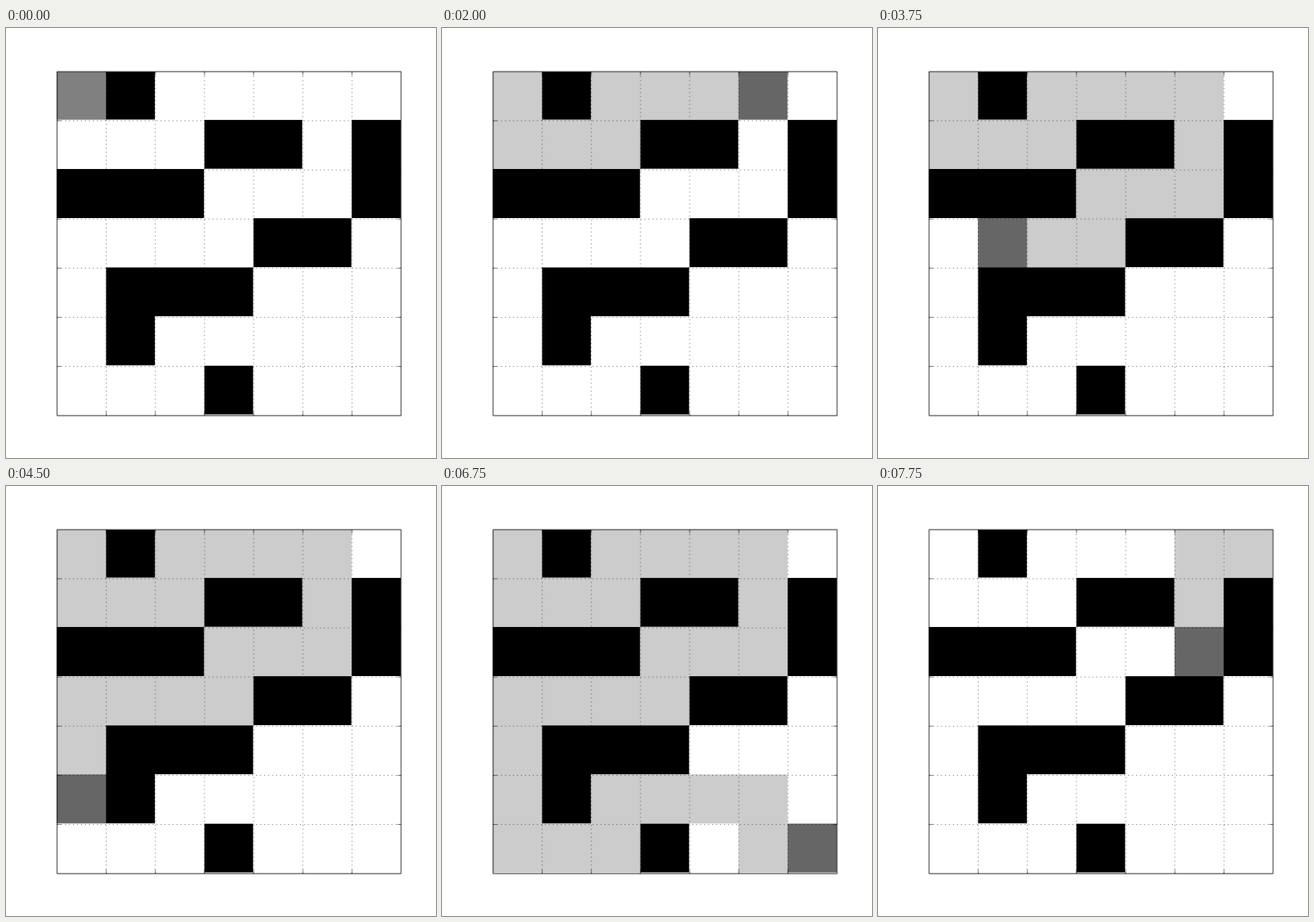
Recreate the animation shown at these times as a matplotlib script. Size 500x500 px, loop 8000 ms.

```python
import matplotlib.pyplot as plt
import numpy as np
from matplotlib.animation import FuncAnimation

STAGE = 500
N = 7
CELL = 400 / N
PX = 0.72  # points per pixel at 100 dpi
GAMMA = 2.2
FRAMES, STEP_MS = 32, 250

MAZE = [
    ".#.....",
    "...##.#",
    "###...#",
    "....##.",
    ".###...",
    ".#.....",
    "...#...",
]
WALLS = np.array([[c == "#" for c in row] for row in MAZE])

START, VISITED, HERE = 0.5, 0.8, 0.4
MOVES = {"U": (-1, 0), "D": (1, 0), "L": (0, -1), "R": (0, 1), "-": (0, 0)}
# Each walk: first frame, start cell, moves ("-" is a blocked move)
WALKS = [
    (0, (0, 0), "-DRRURRRDDLLDLLLDDDRRURRRDR"),
    (28, (0, 6), "LDD"),
]


def grid_at(frame):
    first, cell, moves = [w for w in WALKS if w[0] <= frame][-1]
    grid = np.where(WALLS, 0.0, 1.0)
    steps = moves[:frame - first]
    for m in steps:
        grid[cell] = VISITED
        cell = (cell[0] + MOVES[m][0], cell[1] + MOVES[m][1])
    grid[cell] = HERE if steps else START
    return grid


def coverage(origin, low):
    """Share of every stage pixel (rows) covered by each cell (columns)."""
    edges = np.maximum(origin + CELL * np.arange(N + 1), low)
    px = np.arange(STAGE)[:, None]
    overlap = np.minimum(px + 1, edges[1:]) - np.maximum(px, edges[:-1])
    return np.clip(overlap, 0, 1)


COLS = coverage(59.0, 59)
ROWS = coverage(49.6, 51)


def picture(frame):
    # Cell edges blend in linear light over a white stage
    ink = 1 - grid_at(frame) ** GAMMA
    return np.clip(1 - ROWS @ ink @ COLS.T, 0, 1) ** (1 / GAMMA)


fig = plt.figure(figsize=(5, 5), dpi=100, facecolor="white")
ax = fig.add_axes([0, 0, 1, 1])
board = ax.imshow(picture(0), cmap="gray", vmin=0, vmax=1, aspect="auto",
                  interpolation="nearest", extent=(0, STAGE, STAGE, 0))
ax.set_xlim(0, STAGE)
ax.set_ylim(STAGE, 0)
ax.axis("off")

LEFT, RIGHT, TOP, BOTTOM = 59.4, 459.4, 50.7, 450.7


def line(x, y, width, alpha, ls="-"):
    ax.plot(x, y, color="black", lw=width * PX, alpha=alpha, ls=ls, snap=False,
            solid_capstyle="butt", dash_capstyle="butt")


# Dotted grid with inward ticks on all four sides
DOTS = (0, (1.16, 3.47))
TICK = 4.6
for i in range(1, N):
    x, y = LEFT + CELL * i, TOP + CELL * i
    line([x, x], [BOTTOM, TOP], 1, 0.45, DOTS)
    line([LEFT, RIGHT], [y, y], 1, 0.45, DOTS)
    for edge, d in ((TOP, TICK), (BOTTOM, -TICK)):
        line([x, x], [edge, edge + d], 1, 0.45)
    for edge, d in ((LEFT, TICK), (RIGHT, -TICK)):
        line([edge, edge + d], [y, y], 1, 0.45)

# Soft frame around the board
for x in (LEFT, RIGHT):
    line([x, x], [TOP, BOTTOM], 1.6, 0.5)
for y in (TOP, BOTTOM):
    line([LEFT, RIGHT], [y, y], 1.6, 0.5)


def update(frame):
    board.set_data(picture(frame))
    return [board]


anim = FuncAnimation(fig, update, frames=FRAMES, interval=STEP_MS,
                     repeat=True, repeat_delay=0, blit=False)
plt.show()
```
